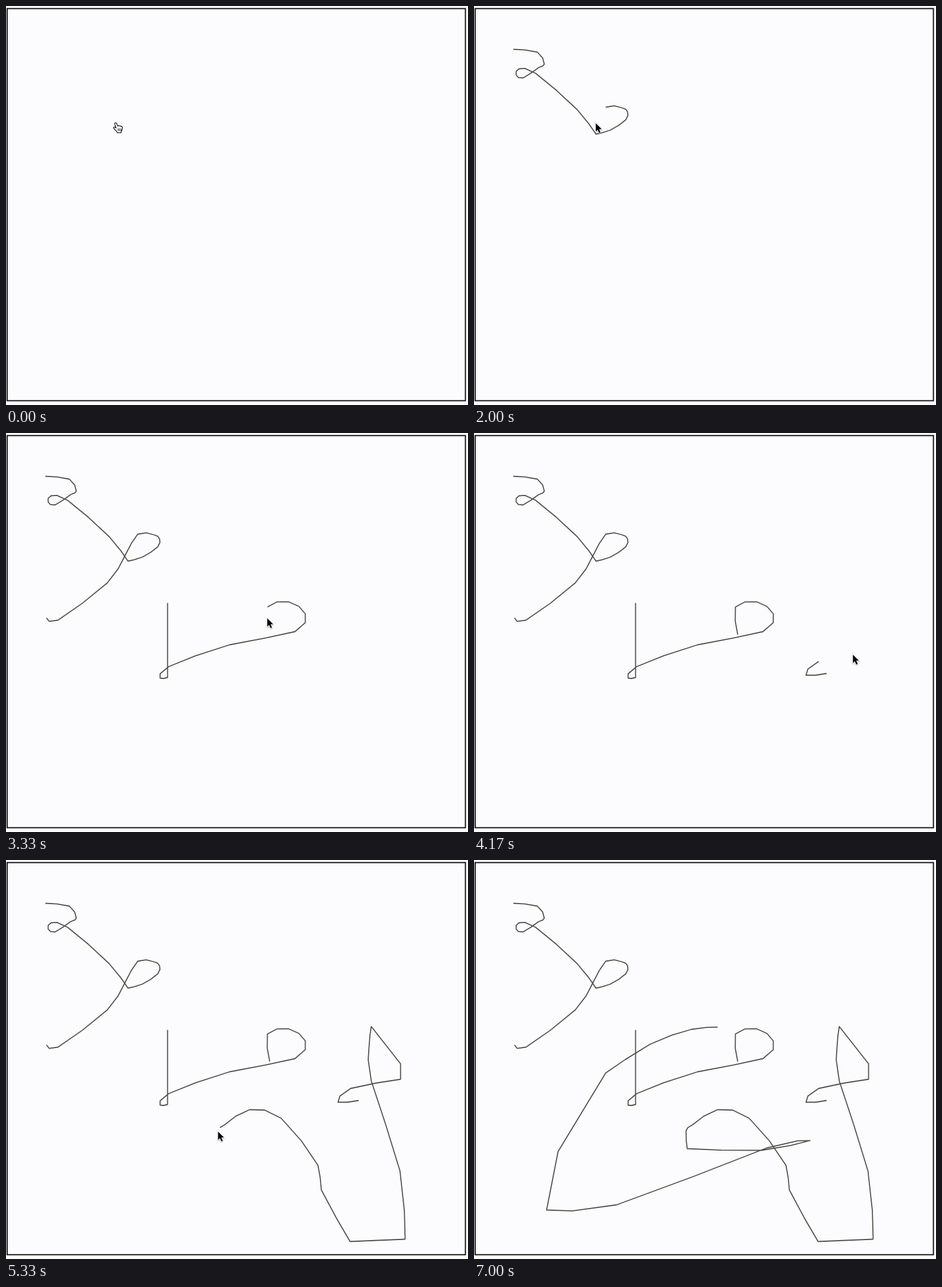
An HTML page with a canvas that plays this animation: 805 px wide and 696 px high, repeating every 7330 ms.

```html
<!DOCTYPE html>
<html lang="en">
<head>
<meta charset="utf-8">
<title>Freehand drawing</title>
<style>
  html, body { margin: 0; width: 100%; height: 100%; overflow: hidden; background: #fcfcfe; }
  canvas { display: block; }
</style>
</head>
<body>
<canvas id="stage" width="805" height="696"></canvas>
<script>
const ctx = document.getElementById('stage').getContext('2d');
const LOOP = 7330, FPS = 12;
const RATE = 2.1;    // vertices drawn per tick
const LEAD = 0.6;    // ticks the pointer runs ahead of the ink
const EXIT_TICK = 84;

// A leg begins at tick `start`, after the pointer has travelled to it.
// Its path holds key points; "!" marks a sharp corner.
const leg = (start, travel, path) => ({ start, travel, points: refine(path) });

const legs = [
  leg(0, 1, '190,202'),
  leg(4.6, 1, '208,177'),
  leg(10.55, 5, '68,75 110,80 122,101 112,107 85,125 73,120 78,109 107,117 179,180 212,223! ' +
    '237,216 264,198 267,184 257,177 229,176 206,215 176,261 90,326 70,322'),
  leg(32.6, 3, '281,296 281,426! 268,427 283,407 389,369 503,346 521,315 492,294 455,303 459,351'),
  leg(48.05, 3, '614,419 578,422 600,398 687,382! 687,355! 636,290! 632,326 636,385 686,542 695,661'),
  leg(57.9, 1, '695,661! 599,665! 549,575 543,532 479,450 424,435 381,461 369,472 371,503! 500,506 ' +
    '585,489! 509,502 248,601 126,610! 146,508! 229,371! 306,321 378,295 424,291'),
  leg(83.6, 8, '745,685')
];

// Adds one vertex between neighbouring key points, on the curve through them.
function refine(path) {
  const keys = path.split(' ').map(key => ({ xy: key.split(',').map(parseFloat), sharp: key.endsWith('!') }));
  return keys.flatMap((a, i) => {
    const b = keys[i + 1];
    if (!b) return [a.xy];
    const before = a.sharp ? a : keys[i - 1] || a;
    const after = b.sharp ? b : keys[i + 2] || b;
    return [a.xy, a.xy.map((v, k) => (9 * (v + b.xy[k]) - before.xy[k] - after.xy[k]) / 16)];
  });
}

const mix = (a, b, f) => a.map((v, k) => v + (b[k] - v) * f);

function along(points, position) {
  const last = points.length - 1, i = Math.floor(position);
  return i >= last ? points[last] : mix(points[i], points[i + 1], position - i);
}

function pointerAt(tick) {
  let at = legs[0].points[0];
  for (const { start, travel, points } of legs) {
    const late = tick - (start - LEAD);
    if (late < 0) return mix(at, points[0], Math.max(0, 1 + late / travel));
    at = along(points, RATE * late);
  }
  return at;
}

function drawInk(tick) {
  ctx.strokeStyle = '#4d4d48';
  ctx.lineWidth = 1.8;
  ctx.lineJoin = 'round';
  for (const { start, points } of legs) {
    const count = Math.max(0, Math.round(RATE * (tick - start)) + 1);
    ctx.beginPath();
    points.slice(0, count).forEach(point => ctx.lineTo(...point));
    ctx.stroke();
  }
}

const arrow = new Path2D('M0 0V14.5L3.3 11.5L5.7 17L8.2 16L5.8 10.4H10.3Z');
const hand = new Path2D('M3.5 1.5Q5.5.5 6.5 3L8.2 7Q9.5 5.5 11 6.8Q12.8 5.8 13.6 7.6Q16.5 7 16.3 10' +
  'Q16.4 13 14.2 16L14 18.6H7.5Q6.5 16 4 14L1 10.5Q.5 8 3 8.8L5.3 10.3L3 3.5Q2.7 2 3.5 1.5Z');
const fingers = new Path2D('M8.8 11V15.5M11.2 11V15.5M13.6 11V15.5');

function drawHand() {
  ctx.translate(186, 202);
  ctx.fillStyle = '#fff';
  ctx.fill(hand);
  ctx.strokeStyle = '#111';
  ctx.lineWidth = 1.3;
  ctx.stroke(hand);
  ctx.lineWidth = 1;
  ctx.stroke(fingers);
}

function drawArrow(x, y) {
  ctx.translate(x, y);
  ctx.shadowColor = 'rgba(0,0,0,.35)';
  ctx.shadowBlur = 2;
  ctx.shadowOffsetY = 1;
  ctx.strokeStyle = '#fff';
  ctx.lineWidth = 2;
  ctx.stroke(arrow);
  ctx.shadowColor = 'transparent';
  ctx.fillStyle = '#000';
  ctx.fill(arrow);
}

function draw() {
  const tick = Math.floor((performance.now() % LOOP + 4) * FPS / 1000);
  ctx.fillStyle = '#fcfcfe';
  ctx.fillRect(0, 0, 805, 696);
  ctx.strokeStyle = '#111';
  ctx.lineWidth = 2;
  ctx.lineJoin = 'miter';
  ctx.strokeRect(2, 4.5, 798.5, 684);
  ctx.save();
  ctx.translate(0.5, 0.5);
  drawInk(tick);
  if (tick < 1) drawHand();
  else if (tick < EXIT_TICK) drawArrow(...pointerAt(tick));
  ctx.restore();
  requestAnimationFrame(draw);
}
draw();
</script>
</body>
</html>
```
